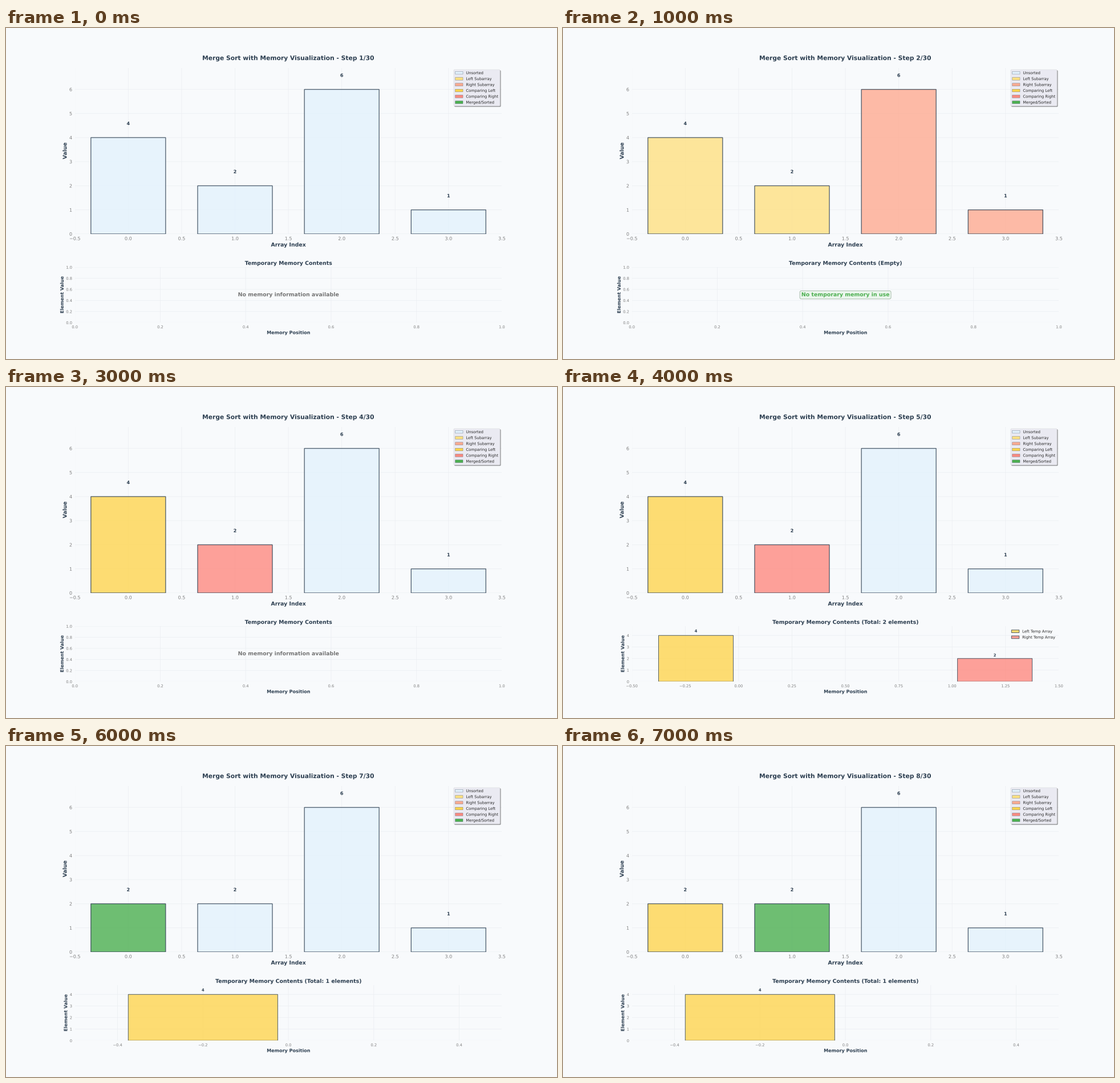
Write a matplotlib script that moves like this. It is 966 px wide and 580 px high and loops after 8000 ms.

```python
import matplotlib.pyplot as plt
from matplotlib.animation import FuncAnimation
from matplotlib.patches import Patch
from matplotlib.patheffects import Normal

W, H, DPI = 966, 580, 72
K = 48.3 / 72  # layout points to pixels

BG, INK, TICK, GRID = "#F8FAFC", "#2C3E50", "#808080", "#ECEFF3"
COLORS = {
    "Unsorted": "#E3F2FD",
    "Left Subarray": "#FFE082",
    "Right Subarray": "#FFAB91",
    "Comparing Left": "#FFD54F",
    "Comparing Right": "#FF8A80",
    "Merged/Sorted": "#4CAF50",
}
U, L, R, CL, CR, M = COLORS

# (values, bar states, memory); memory is None, "empty" or (left, right)
STEPS = [
    ([4, 2, 6, 1], [U, U, U, U], None),
    ([4, 2, 6, 1], [L, L, R, R], "empty"),
    ([4, 2, 6, 1], [L, R, U, U], "empty"),
    ([4, 2, 6, 1], [CL, CR, U, U], None),
    ([4, 2, 6, 1], [CL, CR, U, U], ([4], [2])),
    ([4, 2, 6, 1], [M, CR, U, U], ([4], [2])),
    ([2, 2, 6, 1], [M, U, U, U], ([4], [])),
    ([2, 2, 6, 1], [CL, M, U, U], ([4], [])),
]
TOTAL = 30

# Path effects draw text as outlines; without snapping, parts of pixels count
plt.rcParams.update({
    "font.family": "DejaVu Sans",
    "text.hinting": "none",
    "path.effects": [Normal()],
    "path.snap": False,
    "axes.facecolor": BG,
    "axes.axisbelow": True,
})

fig = plt.figure(figsize=(W / DPI, H / DPI), dpi=DPI, facecolor=BG)
grid = fig.add_gridspec(2, 1, height_ratios=[3, 1], hspace=0.3)
main = fig.add_subplot(grid[0])
memory = fig.add_subplot(grid[1])


def bold(size, color=INK):
    return dict(fontsize=size * K, fontweight="bold", color=color)


def style(ax, title, pad, xlabel, ylabel, sizes):
    title_size, label_size, tick_size = sizes
    ax.set_title(title, pad=pad * K, **bold(title_size))
    ax.set_xlabel(xlabel, labelpad=4 * K, **bold(label_size))
    ax.set_ylabel(ylabel, labelpad=4 * K, **bold(label_size))
    ax.tick_params(length=0, pad=7 * K, labelsize=tick_size * K,
                   labelcolor=TICK)
    ax.grid(True, color=GRID, linewidth=0.8)
    for spine in ax.spines.values():
        spine.set_visible(False)


def add_legend(ax, **options):
    return ax.legend(loc="upper right", fontsize=10 * K, labelspacing=0.53,
                     labelcolor="#262626", **options)


def draw_main(step, values, states):
    main.clear()
    main.bar(range(len(values)), values, width=0.7, alpha=0.8,
             color=[COLORS[s] for s in states], edgecolor=INK,
             linewidth=2 * K)
    top = max(values)
    for i, v in enumerate(values):
        main.text(i, v + 0.08 * top, str(v), ha="center", va="bottom",
                  **bold(12))
    main.set_xlim(-0.5, len(values) - 0.5)
    main.set_ylim(0, 1.15 * top)
    style(main, "Merge Sort with Memory Visualization - "
          f"Step {step}/{TOTAL}", 20, "Array Index", "Value", (16, 14, 12))

    swatches = [Patch(facecolor=c, edgecolor=INK, linewidth=0.3, label=name)
                for name, c in COLORS.items()]
    legend = add_legend(main, handles=swatches, facecolor="#EAEAF2",
                        edgecolor="0.8", framealpha=1,
                        shadow={"ox": 2 * K, "oy": -2 * K})
    legend.get_frame().set_linewidth(0.3)


def draw_temp(left, right):
    parts = [(left, -0.2, CL, "Left Temp Array"),
             (right, len(left) + 0.2, CR, "Right Temp Array")]
    for values, start, state, label in parts:
        if not values:
            continue
        xs = [start + i for i in range(len(values))]
        memory.bar(xs, values, width=0.35, alpha=0.8, color=COLORS[state],
                   edgecolor=INK, linewidth=1.5 * K, label=label)
        for x, v in zip(xs, values):
            memory.text(x, 1.05 * v, str(v), ha="center", va="bottom",
                        **bold(10))
    memory.set_xlim(-0.5, len(left + right) - 0.5)
    memory.set_ylim(0, 1.2 * max(left + right))
    if left and right:
        add_legend(memory, frameon=False)


def draw_memory(content):
    memory.clear()
    title = "Temporary Memory Contents"
    center = dict(ha="center", va="center", transform=memory.transAxes)
    if content is None:
        memory.text(0.5, 0.5, "No memory information available",
                    **center, **bold(14, "#757575"))
    elif content == "empty":
        title += " (Empty)"
        box = dict(boxstyle="round,pad=0.3", facecolor="#EAF5EC",
                   edgecolor="#8FA893", linewidth=0.7)
        memory.text(0.5, 0.5, "No temporary memory in use", bbox=box,
                    **center, **bold(14, COLORS[M]))
    else:
        left, right = content
        title += f" (Total: {len(left + right)} elements)"
        draw_temp(left, right)
    style(memory, title, 6, "Memory Position", "Element Value", (14, 12, 10))


def update(i):
    values, states, content = STEPS[i]
    draw_main(i + 1, values, states)
    draw_memory(content)
    return []


anim = FuncAnimation(fig, update, frames=len(STEPS), interval=1000,
                     init_func=lambda: update(0), repeat=True,
                     repeat_delay=0, blit=False)
plt.show()
```
